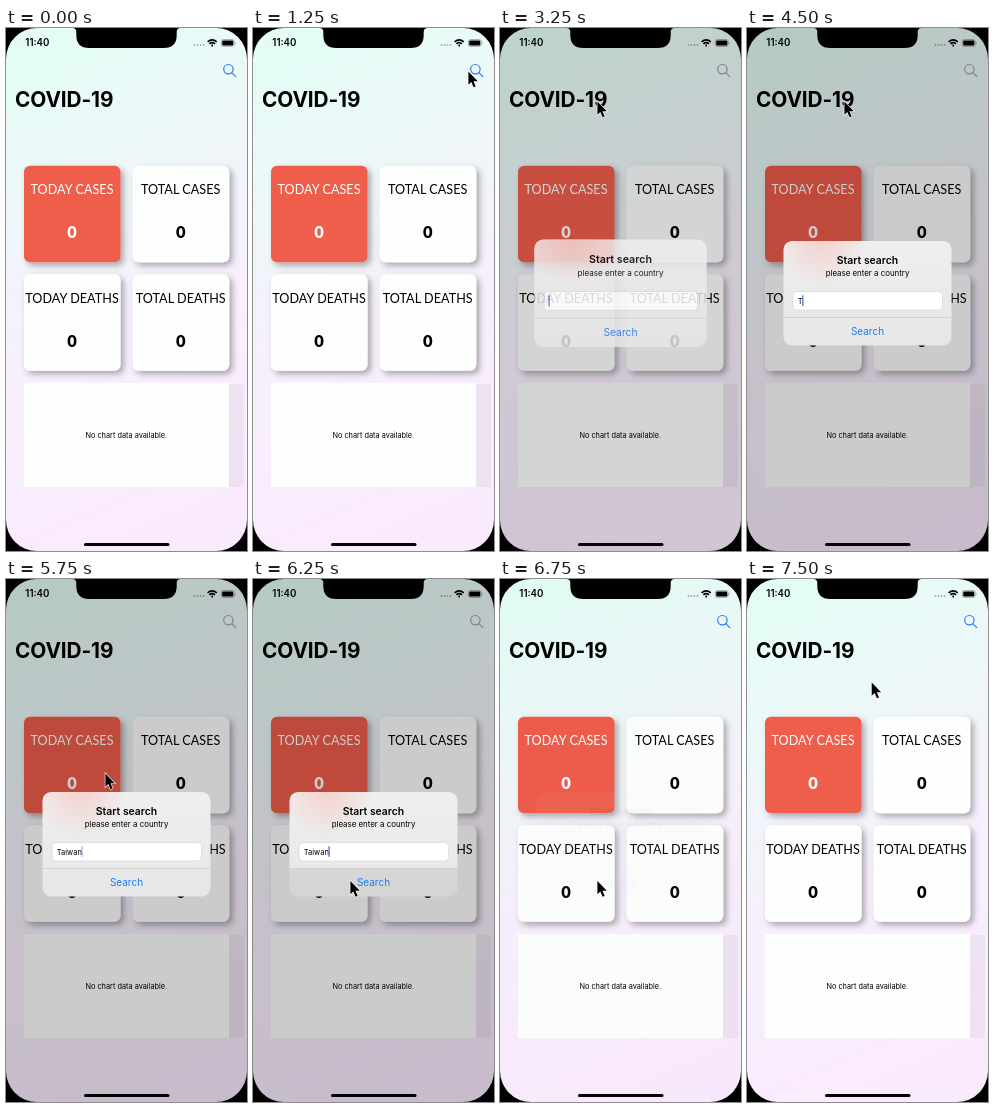
Recreate the animation shown at these times as an HTML page. Size 241 by 523 pixels, loop 8 s.

```html
<!DOCTYPE html>
<html lang="en">
<head>
<meta charset="utf-8">
<style>
  html, body { margin: 0; width: 100%; height: 100%; overflow: hidden; background: #000; }
  svg { display: block; width: 100vw; height: 100vh; }
  text { font-family: Inter, "Open Sans", sans-serif; }
  .mid { text-anchor: middle; }
  .label { font: 400 12.6px Lato, sans-serif; letter-spacing: .05px; }
  .count { font: 900 16.5px Lato, sans-serif; }
</style>
</head>
<body>
<svg viewBox="0 0 241 523">
  <defs>
    <linearGradient id="sky" gradientUnits="userSpaceOnUse" x1="0" y1="0" x2="210" y2="480">
      <stop offset="0" stop-color="#e1fdf5"/>
      <stop offset=".25" stop-color="#ebf9f8"/>
      <stop offset=".6" stop-color="#f7f0fc"/>
      <stop offset="1" stop-color="#faeafd"/>
    </linearGradient>
    <linearGradient id="glass" x2="0" y2="1">
      <stop offset="0" stop-color="#efefef"/>
      <stop offset="1" stop-color="#e6e6e6"/>
    </linearGradient>
    <radialGradient id="glow" gradientUnits="userSpaceOnUse" cx="74" cy="210" r="48">
      <stop offset="0" stop-color="#f6c9c3" stop-opacity=".8"/>
      <stop offset="1" stop-color="#f6c9c3" stop-opacity="0"/>
    </radialGradient>
    <filter id="shadow" x="-20%" y="-20%" width="140%" height="140%">
      <feDropShadow dx="3.2" dy="3.2" stdDeviation="3" flood-opacity=".32"/>
    </filter>
  </defs>

  <rect width="241" height="523" fill="url(#sky)"/>
  <text x="9" y="78.6" font-size="20.8" font-weight="700" letter-spacing="-.1">COVID-19</text>
  <g id="icon" fill="none" stroke-width="1.2" stroke-linecap="round">
    <circle cx="222.4" cy="41.2" r="4.7"/>
    <path d="M225.8 44.6L229.8 48.6"/>
  </g>

  <g id="cards"></g>
  <rect x="223" y="356" width="15" height="103" opacity=".045"/>
  <rect x="18" y="355" width="205" height="104" fill="#fdfefe"/>
  <text class="mid" x="120.3" y="409.6" font-size="7.35">No chart data available.</text>

  <!-- status bar -->
  <text class="mid" x="31.4" y="18.4" font-size="9.7" font-weight="600">11:40</text>
  <path d="M188.5 17h10" stroke="#aaa" stroke-width="1.8" stroke-linecap="round" stroke-dasharray="0 3"/>
  <g fill="none" stroke="#000" stroke-width="1.6">
    <path d="M201.6 13.8q4.6-4 9.2 0M203.4 15.9q2.8-2.4 5.6 0"/>
    <path d="M206.2 16.4v2"/>
  </g>
  <rect x="215.3" y="11.6" width="12.9" height="6.8" rx="2" fill="none" stroke="#888" stroke-width=".7"/>
  <rect x="216.2" y="12.5" width="11.1" height="5" rx="1.2"/>
  <path d="M229.2 13.8q1.2 1.2 0 2.4z" fill="#888"/>

  <rect id="dim" width="241" height="523"/>

  <g id="alert">
    <rect x="36.5" y="213" width="168" height="104.5" rx="8.6" fill="url(#glass)"/>
    <rect x="36.5" y="213" width="168" height="104.5" rx="8.6" fill="url(#glow)"/>
    <path id="press" d="M36.5 289.5h168v19.4a8.6 8.6 0 0 1-8.6 8.6h-150.8a8.6 8.6 0 0 1-8.6-8.6z"/>
    <path d="M36.5 289.5h168" stroke="#cbcbcb" stroke-width=".7"/>
    <text class="mid" x="120.5" y="235.7" font-size="10.4" font-weight="600">Start search</text>
    <text class="mid" x="120.5" y="248" font-size="7.9">please enter a country</text>
    <rect x="46" y="263.5" width="149.5" height="18.5" rx="4" fill="#fff" stroke="#d0d0d0" stroke-width=".6"/>
    <text id="typed" x="50.8" y="275.6" font-size="7.5"></text>
    <rect id="caret" y="267.3" width="1.2" height="10.6" fill="#3d62d8"/>
    <text class="mid" x="120.5" y="307.2" font-size="10" fill="#1f7bf5">Search</text>
  </g>

  <path id="mouse" d="M.4 .4V13.8L3.3 11L5.6 16.3L7.7 15.4L5.5 10.2H9.8Z" stroke="#fff" stroke-width="1.2" paint-order="stroke"/>

  <!-- phone edge, notch, home bar -->
  <path fill-rule="evenodd" d="M0 0H241V523H0ZM31 0A31 31 0 0 0 0 31V492A31 31 0 0 0 31 523H210A31 31 0 0 0 241 492V31A31 31 0 0 0 210 0Z"/>
  <path d="M66.3 0q4 0 4 4v3q0 13 13 13h74.4q13 0 13-13v-3q0-4 4-4z"/>
  <rect x="78" y="515" width="85.5" height="3" rx="1.5"/>
</svg>

<script>
const el = id => document.getElementById(id);
const set = (id, attrs) => {
  for (const k in attrs) el(id).setAttribute(k, attrs[k]);
};

const LOOP = 8000, TICK = 250;

const card = (x, y, label, fill = '#fdfefe', ink = '#000') => `
  <rect x="${x}" y="${y}" width="96.5" height="96.5" rx="6" fill="${fill}" filter="url(#shadow)"/>
  <g class="mid" fill="${ink}">
    <text class="label" x="${x + 48}" y="${y + 28.3}">${label}</text>
    <text class="count" x="${x + 48}" y="${y + 72.3}">0</text>
  </g>`;
el('cards').innerHTML =
  card(18, 137.8, 'TODAY CASES', '#ef5d4c', '#fff') +
  card(126.7, 137.8, 'TOTAL CASES') +
  card(18, 246.3, 'TODAY DEATHS') +
  card(126.7, 246.3, 'TOTAL DEATHS');

// Each track: [start time, ...values], held until the next entry.
const mouse = [[0, -50, 0], [750, 234, 13], [1000, 216, 38], [1250, 215, 43],
  [2500, 117, 65], [2750, 97, 73], [5750, 99, 194], [6000, 98, 285],
  [6250, 97, 301.5], [7000, 124.3, 103]];
const typing = [[0, ''], [4500, 'T'], [4750, 'Ta'], [5000, 'Taiw'], [5250, 'Taiwan']];
const caret = [[0, 1], [3750, .5], [4000, 0], [4250, 1], [5750, .5], [6000, 0], [6250, 1], [6500, 0]];
// alert opacity, alert scale, dimming
const modal = [[0, 0, 1, 0], [3250, .85, 1.027, .165], [3500, 1, 1, .2],
  [6500, .4, 1, .06], [6750, .04, 1, .008], [7000, 0, 1, 0]];
const icon = [[0, '#2a7bf6', 1], [1500, '#2a7bf6', .4], [1750, '#2a7bf6', 1],
  [3250, '#929ba3', 1], [3500, '#a0a0a2', 1], [6500, '#4580cf', 1], [6750, '#2d7bf2', 1], [7000, '#2a7bf6', 1]];

const at = (track, t) => track.findLast(k => k[0] <= t).slice(1);

function draw(t) {
  const [mx, my] = at(mouse, t);
  const [alpha, scale, dim] = at(modal, t);
  const [stroke, opacity] = at(icon, t);
  set('mouse', { transform: `translate(${mx} ${my})` });
  set('icon', { stroke, opacity });
  set('dim', { opacity: dim });
  set('alert', {
    opacity: alpha,
    transform: `translate(120.5 265.3) scale(${scale}) translate(-120.5 -265.3)`
  });
  set('press', { opacity: t === 6250 ? .08 : 0 });
  const typed = el('typed');
  typed.textContent = at(typing, t)[0];
  const end = typed.textContent ? typed.getComputedTextLength() : 0;
  set('caret', { x: 50.4 + end, opacity: at(caret, t)[0] });
}

function loop() {
  const t = performance.now() % LOOP;
  draw(Math.floor(t / TICK) * TICK);
  requestAnimationFrame(loop);
}
loop();
</script>
</body>
</html>
```
